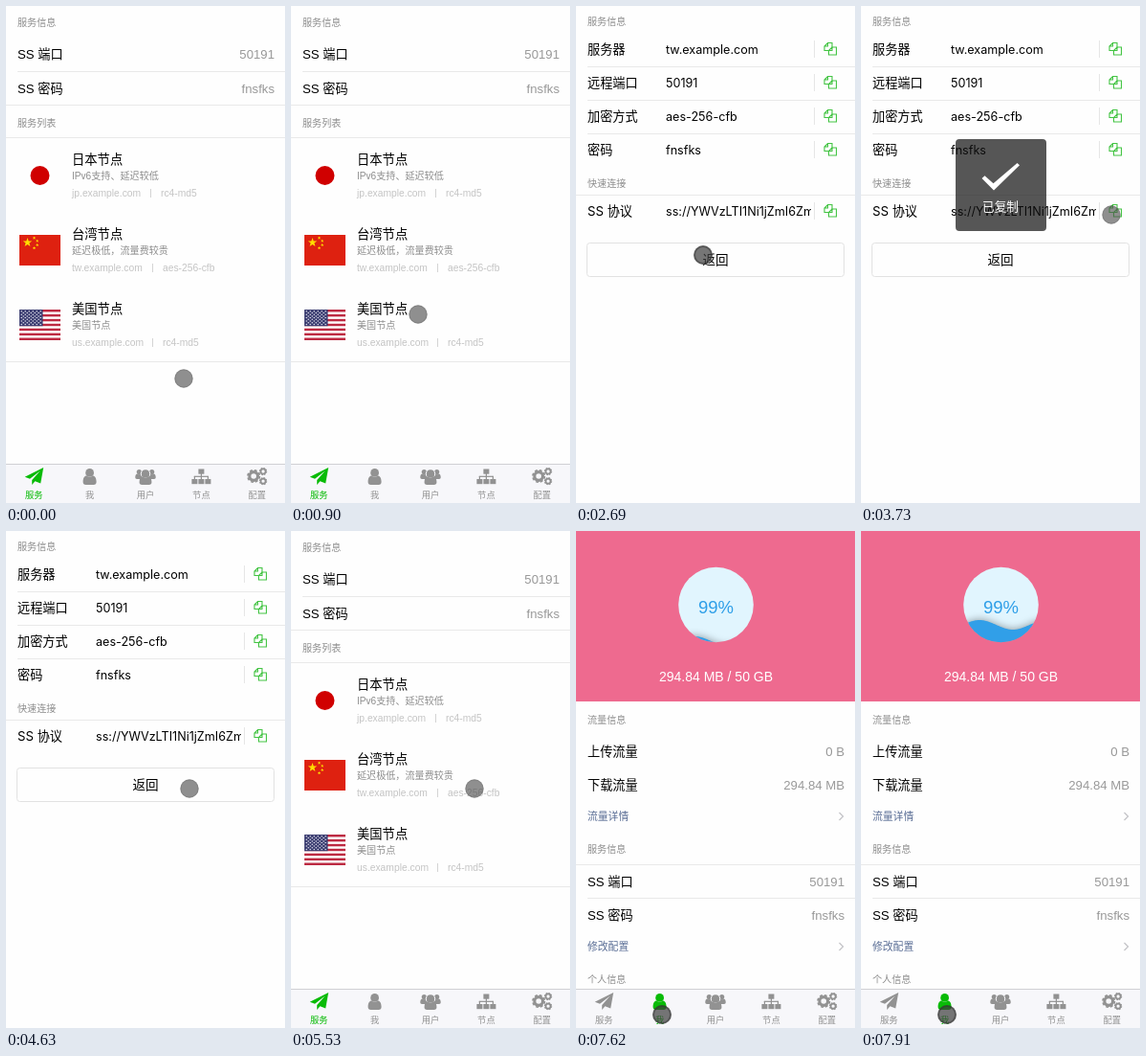
An HTML page with a canvas that plays this animation: 292 by 519 pixels, repeating every 8 s.

```html
<!DOCTYPE html>
<html lang="zh-CN">
<head>
<meta charset="utf-8">
<title>节点服务</title>
<style>
html, body { margin: 0; width: 100%; height: 100%; overflow: hidden; background: #fefefe; }
canvas { display: block; width: 292px; height: 519px; }
</style>
</head>
<body>
<canvas id="stage"></canvas>
<script>
const W = 292, H = 519, LOOP = 8000;
const canvas = document.getElementById('stage');
const ctx = canvas.getContext('2d');
const ratio = window.devicePixelRatio || 1;
canvas.width = W * ratio;
canvas.height = H * ratio;

const SANS = '"Liberation Sans", "Noto Sans CJK SC", "Noto Sans CJK", sans-serif';
const UI = 'Inter, "Noto Sans CJK SC", "Noto Sans CJK", sans-serif';
const BG = '#fefefe', INK = '#000', GREY = '#999', PALE = '#c4c4c4';
const LINE = '#e9e9e9', GREEN = '#09bb07', LINK = '#586c94';

// Pointer stops: time, x, y, pressed
const STOPS = [
  [0, 186, 389], [300, 160, 394], [450, 137, 396],
  [900, 133, 322], [1050, 125, 286], [1200, 121, 270], [1350, 122, 264], [1500, 128, 272],
  [2690, 133, 260, 1], [2840, 166, 246], [2990, 214, 230], [3140, 250, 221], [3280, 262, 218],
  [4330, 250, 230], [4480, 216, 256], [4630, 192, 269],
  [6720, 182, 300], [6870, 128, 410], [7020, 68, 492], [7170, 90, 505, 1]
];

// Toast opacity and dashboard water line, held between steps
const TOAST = [[0, 0], [3580, 0.5], [3730, 1], [4330, 0.5], [4480, 0]];
const WATER = [[7620, 115], [7770, 107], [7910, 98]];

function held(list, t) {
  let hit = list[0];
  for (const item of list) if (item[0] <= t) hit = item;
  return hit;
}

function text(s, x, cy, size, color, align = 'left', family = SANS, weight = 400) {
  ctx.font = `${weight} ${size}px ${family}`;
  ctx.textAlign = align;
  ctx.fillStyle = color;
  ctx.fillText(s, x, cy + size * 0.36);
}

function rect(x, y, w, h, color) {
  ctx.fillStyle = color;
  ctx.fillRect(x, y, w, h);
}

function disc(x, y, r, color) {
  ctx.fillStyle = color;
  ctx.beginPath();
  ctx.arc(x, y, r, 0, Math.PI * 2);
  ctx.fill();
}

function round(x, y, w, h, r) {
  ctx.beginPath();
  ctx.roundRect(x, y, w, h, r);
}

function rule(y, x = 0) { rect(x, y, W - x, 1, LINE); }
function label(s, y) { text(s, 12, y, 10.1, '#8c8c8c'); }

function row(name, value, y) {
  text(name, 12, y, 13.2, INK);
  text(value, 281, y, 13.2, GREY, 'right');
}

function star(x, y, r, color) {
  ctx.fillStyle = color;
  ctx.beginPath();
  for (let i = 0; i < 10; i++) {
    const a = -Math.PI / 2 + i * Math.PI / 5, d = i % 2 ? r * 0.4 : r;
    ctx.lineTo(x + d * Math.cos(a), y + d * Math.sin(a));
  }
  ctx.fill();
}

function flagCN(x, y) {
  rect(x, y, 43, 32, '#de2110');
  star(x + 8.5, y + 8, 5, '#ffde00');
  for (const [dx, dy] of [[15.5, 3.2], [18.7, 6.3], [18.7, 10.5], [15.5, 13.7]])
    star(x + dx, y + dy, 1.8, '#ffde00');
}

function flagUS(x, y) {
  const h = 32 / 13;
  rect(x, y, 43, 32, '#fff');
  for (let i = 0; i < 13; i += 2) rect(x, y + i * h, 43, h, '#bd2a42');
  rect(x, y, 24.5, h * 7, '#3a3c70');
  for (let r = 0; r < 9; r++)
    for (let c = 0; c < 6 - r % 2; c++)
      disc(x + 2.2 + c * 4 + r % 2 * 2, y + 1.8 + r * 1.7, 0.75, '#e8e8f2');
}

function node(name, note, host, method, sep, y) {
  text(name, 69, y, 13.3, INK);
  text(note, 69, y + 17, 10.1, '#8c8c8c');
  text(host, 69, y + 35, 10.3, PALE);
  rect(sep, y + 31, 1, 9, '#d4d4d4');
  text(method, sep + 11, y + 35, 10.3, PALE);
}

const PLANE = new Path2D('M10-9L7 7.5 1.2 5.2-2 9V4L6.5-5.5-4.2 2.8-9.5.7Z');
const BODY = new Path2D('M-7 6C-7 2-5.4-.4-3.2-.4Q0 2.2 3.2-.4C5.4-.4 7 2 7 6Q7 9 4 9H-4Q-7 9-7 6Z');

function person(x, y, k, color) {
  ctx.save();
  ctx.translate(x, y);
  ctx.scale(k, k);
  disc(0, -3.6, 4.4, color);
  ctx.fill(BODY);
  ctx.restore();
}

function gear(x, y, r, color) {
  const ring = (radius, width, dash) => {
    ctx.lineWidth = width;
    ctx.setLineDash(dash);
    ctx.beginPath();
    ctx.arc(x, y, radius, 0, Math.PI * 2);
    ctx.stroke();
  };
  const tooth = Math.PI * r / 8;
  ctx.strokeStyle = color;
  ring(r * 0.62, r * 0.44, []);
  ring(r * 0.88, r * 0.26, [tooth, tooth * 0.76]);
  ctx.setLineDash([]);
}

const ICONS = [
  c => { ctx.fillStyle = c; ctx.fill(PLANE); },
  c => person(0, 0, 1, c),
  c => {
    person(-6.7, -2.3, 0.58, c);
    person(6.7, -2.3, 0.58, c);
    ctx.strokeStyle = '#f7f7fa';
    ctx.lineWidth = 1;
    ctx.beginPath();
    ctx.arc(0, -2.5, 4.7, 0, Math.PI * 2);
    ctx.stroke();
    person(0, 0.7, 0.92, c);
  },
  c => {
    rect(-3, -7.5, 6, 5.2, c);
    for (const x of [-10, -3, 4]) {
      rect(x, 3, 6, 5.2, c);
      rect(x + 2.4, 0, 1.2, 3, c);
    }
    rect(-7.6, -0.3, 15.2, 1.2, c);
    rect(-0.6, -3, 1.2, 4, c);
  },
  c => {
    gear(-3.6, 0, 7, c);
    gear(6.3, -5, 4.1, c);
    gear(6.3, 5.2, 4.1, c);
  }
];

function tabs(active) {
  rect(0, 478, W, 41, '#f7f7fa');
  rect(0, 478, W, 1, '#d0d0d4');
  ['服务', '我', '用户', '节点', '配置'].forEach((name, i) => {
    const x = 29.2 + i * 58.4, color = i === active ? GREEN : '#929292';
    ctx.save();
    ctx.translate(x, 491);
    ICONS[i](color);
    ctx.restore();
    text(name, x, 510.3, 9.3, color, 'center', SANS, i === active ? 500 : 400);
  });
}

function listPage() {
  label('服务信息', 17);
  row('SS 端口', '50191', 50);
  rule(68, 12);
  row('SS 密码', 'fnsfks', 86);
  rule(103);
  label('服务列表', 122);
  rule(137);
  disc(35.5, 177, 10, '#d00000');
  flagCN(14, 239);
  flagUS(14, 317);
  node('日本节点', 'IPv6支持、延迟较低', 'jp.example.com', 'rc4-md5', 151, 160);
  node('台湾节点', '延迟极低，流量费较贵', 'tw.example.com', 'aes-256-cfb', 153, 238);
  node('美国节点', '美国节点', 'us.example.com', 'rc4-md5', 153, 316);
  rule(371);
  tabs(0);
}

const SHEET = new Path2D('M3.5 0H8V8H0V3.5ZM3.5 0V3.5H0');

function copyIcon(x, y) {
  ctx.strokeStyle = '#43c443';
  ctx.lineWidth = 1.1;
  for (const [dx, dy] of [[-6, -6.5], [-1.5, -2]]) {
    ctx.save();
    ctx.translate(x + dx, y + dy);
    ctx.fillStyle = BG;
    ctx.fillRect(1, 1, 7, 7);
    ctx.stroke(SHEET);
    ctx.restore();
  }
}

function field(name, value, y) {
  text(name, 12, y, 13.2, INK, 'left', UI);
  ctx.save();
  ctx.beginPath();
  ctx.rect(94, y - 12, 152, 24);
  ctx.clip();
  text(value, 94, y, 12.6, INK, 'left', UI);
  ctx.restore();
  rect(249, y - 9, 1, 18, '#e5e5e5');
  copyIcon(266, y);
}

function detailPage() {
  label('服务信息', 16);
  field('服务器', 'tw.example.com', 45);
  field('远程端口', '50191', 80);
  field('加密方式', 'aes-256-cfb', 115);
  field('密码', 'fnsfks', 150);
  [63, 98, 133].forEach(y => rule(y, 12));
  label('快速连接', 185);
  rule(197);
  field('SS 协议', 'ss://YWVzLTI1Ni1jZmI6Zm5zZmtz', 214);
  ctx.strokeStyle = '#e2e2e2';
  ctx.lineWidth = 1;
  round(11.5, 247.5, 269, 35, 3);
  ctx.stroke();
  text('返回', 146, 265, 13.6, INK, 'center');
}

function toast(alpha) {
  if (!alpha) return;
  ctx.save();
  ctx.globalAlpha = alpha;
  ctx.fillStyle = 'rgba(17,17,17,.7)';
  round(99, 139, 95, 96, 4);
  ctx.fill();
  ctx.fillStyle = '#fff';
  ctx.fill(new Path2D('M126.5 180L129.5 177.3 138.5 185.2 163.5 164 166 166.2 139 192.5Z'));
  text('已复制', 146, 209, 12.6, '#fff', 'center', SANS, 500);
  ctx.restore();
}

function gauge(level) {
  disc(146.5, 77, 39.3, '#e1f5fe');
  text('99%', 146.5, 79, 18.5, '#2f9fe8', 'center');
  ctx.save();
  ctx.beginPath();
  ctx.arc(146.5, 77, 39.3, 0, Math.PI * 2);
  ctx.clip();
  ctx.shadowColor = 'rgba(0,0,0,.4)';
  ctx.shadowBlur = 8 * ratio;
  ctx.fillStyle = '#319fe8';
  ctx.beginPath();
  ctx.moveTo(100, 125);
  for (let x = 100; x <= 192; x++)
    ctx.lineTo(x, level - 5 * Math.cos((x - 124) * Math.PI * 2 / 70));
  ctx.lineTo(192, 125);
  ctx.fill();
  ctx.restore();
}

function more(name, y) {
  text(name, 12, y, 10.8, LINK, 'left', SANS, 500);
  ctx.strokeStyle = '#c4c4c8';
  ctx.lineWidth = 1.3;
  ctx.beginPath();
  ctx.moveTo(275.5, y - 4);
  ctx.lineTo(279.5, y);
  ctx.lineTo(275.5, y + 4);
  ctx.stroke();
}

function userPage(t) {
  rect(0, 0, W, 178, '#ee6a8f');
  gauge(held(WATER, t)[1]);
  text('294.84 MB / 50 GB', 146.5, 152, 14, '#fff', 'center');
  label('流量信息', 197);
  row('上传流量', '0 B', 230);
  row('下载流量', '294.84 MB', 265);
  more('流量详情', 298);
  label('服务信息', 332);
  rule(348);
  row('SS 端口', '50191', 366);
  rule(383, 12);
  row('SS 密码', 'fnsfks', 401);
  more('修改配置', 434);
  label('个人信息', 468);
  tabs(1);
}

function pointer(t) {
  const [, x, y, pressed] = held(STOPS, t);
  disc(x, y, 9.7, pressed ? 'rgba(60,60,60,.7)' : 'rgba(80,80,80,.64)');
  ctx.strokeStyle = pressed ? 'rgba(50,50,50,.5)' : 'rgba(90,90,90,.25)';
  ctx.lineWidth = pressed ? 2 : 1;
  ctx.beginPath();
  ctx.arc(x, y, 9, 0, Math.PI * 2);
  ctx.stroke();
}

function draw(now) {
  const t = now % LOOP;
  ctx.setTransform(ratio, 0, 0, ratio, 0, 0);
  rect(0, 0, W, H, BG);
  if (t >= 7620) {
    userPage(t);
  } else if (t >= 1940 && t < 5530) {
    detailPage();
    toast(held(TOAST, t)[1]);
  } else {
    listPage();
  }
  pointer(t);
}

const start = performance.now();
function tick() {
  draw(performance.now() - start);
  requestAnimationFrame(tick);
}
tick();
</script>
</body>
</html>
```
